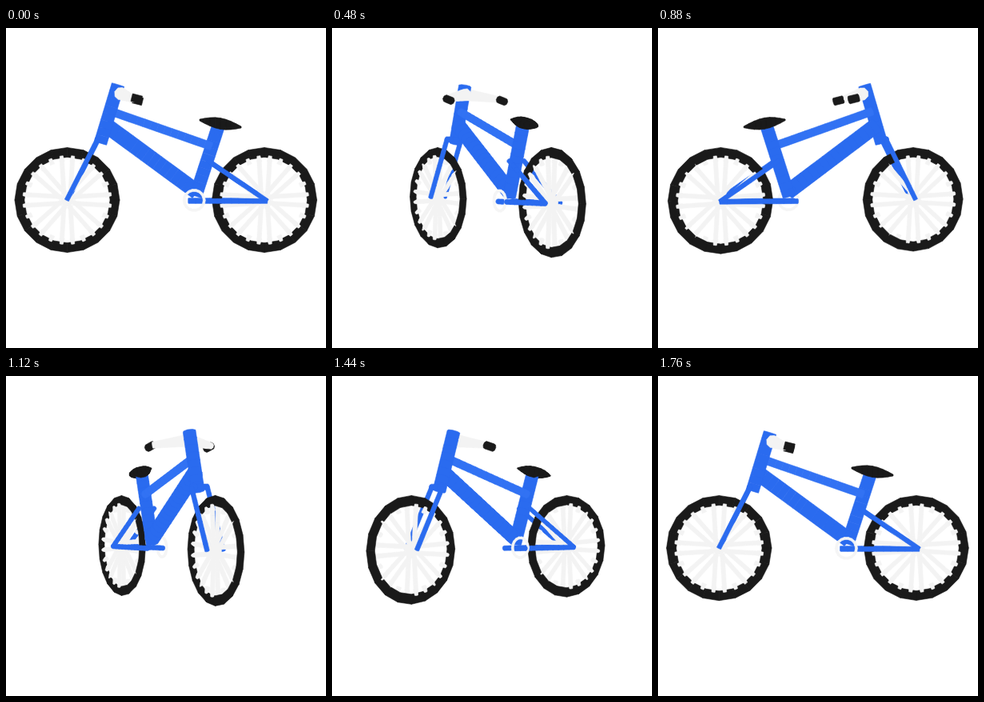
An HTML page with a canvas for the animation above (1840 ms loop, 400 px wide and 400 px high).

```html
<!DOCTYPE html>
<html lang="en">
<head>
<meta charset="utf-8">
<title>Turning bicycle</title>
<style>
  html, body { margin: 0; width: 100%; height: 100%; overflow: hidden; background: #fff; }
  canvas { display: block; width: 400px; height: 400px; }
</style>
</head>
<body>
<canvas id="stage" width="400" height="400"></canvas>
<script>
const ctx = document.getElementById('stage').getContext('2d');
const LOOP = 1840, STEP = 80, STEPS = LOOP / STEP;
const CX = 200, HORIZON = 150, DISTANCE = 2200;
const BLUE = '#2a6bef', SKY = '#3272f3', BLACK = '#1a1a1a', PALE = '#f3f3f3';
const { PI, sin, cos, hypot } = Math;

// The model is written in side-view stage coordinates: x, y and depth z.
const parts = [];
const mix = (a, b, t) => a.map((v, i) => v + (b[i] - v) * t);
const cross = (a, b) => [
  a[1] * b[2] - a[2] * b[1], a[2] * b[0] - a[0] * b[2], a[0] * b[1] - a[1] * b[0]];
const unit = v => { const n = hypot(...v); return v.map(c => c / n); };
const at = (point, z) => [point[0], point[1], z];

function ring(center, u, v, ru, rv = ru, sides = 8) {
  return Array.from({ length: sides }, (_, i) => {
    const a = i / sides * 2 * PI;
    return center.map((c, k) => c + u[k] * ru * cos(a) + v[k] * rv * sin(a));
  });
}

// A solid through a row of sections, cut into pieces for depth sorting.
function loft(section, count, color, bias = 0) {
  for (let i = 0; i < count; i++) {
    const points = [...section(i / count), ...section((i + 1) / count)];
    parts.push({ points, color, bias });
  }
}

function tube(a, b, r0, color, r1 = r0, bias = 0) {
  const axis = b.map((v, i) => v - a[i]);
  const u = unit(cross(unit(axis), [0, 0.02, 1])), v = cross(unit(axis), u);
  const count = Math.max(1, Math.round(hypot(...axis) / 9));
  loft(t => ring(mix(a, b, t), u, v, r0 + (r1 - r0) * t), count, color, bias);
}

function pair(a, za, b, zb, ...style) {
  for (const side of [-1, 1]) tube(at(a, za * side), at(b, zb * side), ...style);
}

function torus([x, y, z], radius, r, depth, count, color) {
  loft(t => {
    const out = [cos(t * 2 * PI), sin(t * 2 * PI), 0];
    return ring([x + radius * out[0], y + radius * out[1], z], out, [0, 0, 1], r, depth);
  }, count, color);
}

function wheel([x, y]) {
  const polar = (r, turn) => [x + r * cos(turn * 2 * PI), y + r * sin(turn * 2 * PI), 0];
  torus([x, y, 0], 59.6, 6, 3, 20, BLACK);
  for (let i = 0; i < 8; i++) {
    for (const side of [-1, 1]) {
      tube(polar(8, i / 8 + side / 12), polar(51, i / 8 + side / 48), 2.6, PALE);
    }
  }
  for (let i = 0.5; i < 24; i++) {
    tube(polar(48, i / 24), polar(55.5, i / 24), 3, PALE, 2, 1.5);
  }
  tube([x, y, -4], [x, y, 4], 8, PALE);
}

function saddle(nose, tail) {
  loft(t => ring(mix(nose, tail, t), [0, 1, 0], [0, 0, 1],
    1 + 6 * sin(PI * t), 2 + 10 * sin(PI * t ** 1.3), 10), 8, BLACK, 4);
}

const frontHub = [76.5, 215, 0], rearHub = [323, 215, 0];
const headTop = [140, 71, 0], headEnd = [118, 144, 0], crown = [115, 139, 0];
const seat = [265, 124, 0], bracket = [237, 210, 0];
const stem = [143, 82, 0], barEnd = [158, 88, 0], gripEnd = [170, 91, 0];
const onHead = t => mix(headTop, headEnd, t);
const onSeatTube = t => mix(seat, bracket, t);

wheel(frontHub);
wheel(rearHub);
tube(headTop, headEnd, 8, BLUE);
tube(onHead(0.45), onSeatTube(0.28), 5, SKY);
tube(onHead(0.69), onSeatTube(0.94), 9.5, BLUE);
tube(seat, bracket, 8, BLUE);
tube(at(crown, -12), at(crown, 12), 3.5, BLUE);
pair(frontHub, 11, crown, 11, 2.8, BLUE);
pair([326, 216], 11, [228, 216], 11, 3, BLUE);
pair([326, 216], 11, onSeatTube(0.48), 11, 2.8, BLUE);
torus([235, 215, 13], 12.5, 1.5, 1.5, 18, '#f5f5f5');
pair(stem, 0, barEnd, 41, 8, PALE, 4, -3);
pair(barEnd, 41, gripEnd, 41, 4.8, BLACK);
saddle([242, 115, 0], [294, 124, 0]);

function hull(points) {
  points.sort((a, b) => a[0] - b[0] || a[1] - b[1]);
  const chain = list => {
    const out = [];
    for (const p of list) {
      while (out.length > 1) {
        const [a, b] = out.slice(-2);
        if ((b[0] - a[0]) * (p[1] - a[1]) - (b[1] - a[1]) * (p[0] - a[0]) > 0) break;
        out.pop();
      }
      out.push(p);
    }
    return out.slice(0, -1);
  };
  return [...chain(points), ...chain(points.slice().reverse())];
}

// Turn around the vertical axis, slow at both ends of the loop.
function turnAt(t) {
  return (180 * (1 - cos(PI * t)) - 2.3 * sin(2 * PI * t)) * PI / 180;
}

function draw(step) {
  const turn = turnAt(step / STEPS), c = cos(turn), s = sin(turn);
  const shapes = parts.map(({ points, color, bias }) => {
    let depth = bias;
    const flat = points.map(([x, y, z]) => {
      const near = (x - CX) * s + z * c;
      const scale = DISTANCE / (DISTANCE - near);
      depth += near / points.length;
      return [CX + ((x - CX) * c - z * s) * scale, HORIZON + (y - HORIZON) * scale];
    });
    return { flat, color, depth };
  }).sort((a, b) => a.depth - b.depth);

  ctx.fillStyle = '#fff';
  ctx.fillRect(0, 0, 400, 400);
  ctx.lineWidth = 0.6;
  ctx.lineJoin = 'round';
  for (const { flat, color } of shapes) {
    ctx.beginPath();
    for (const p of hull(flat)) ctx.lineTo(...p);
    ctx.closePath();
    ctx.fillStyle = ctx.strokeStyle = color;
    ctx.fill();
    ctx.stroke();
  }
}

let shown = -1;
function tick() {
  const step = Math.floor(performance.now() % LOOP / STEP);
  if (step !== shown) draw(shown = step);
  requestAnimationFrame(tick);
}
tick();
</script>
</body>
</html>
```
